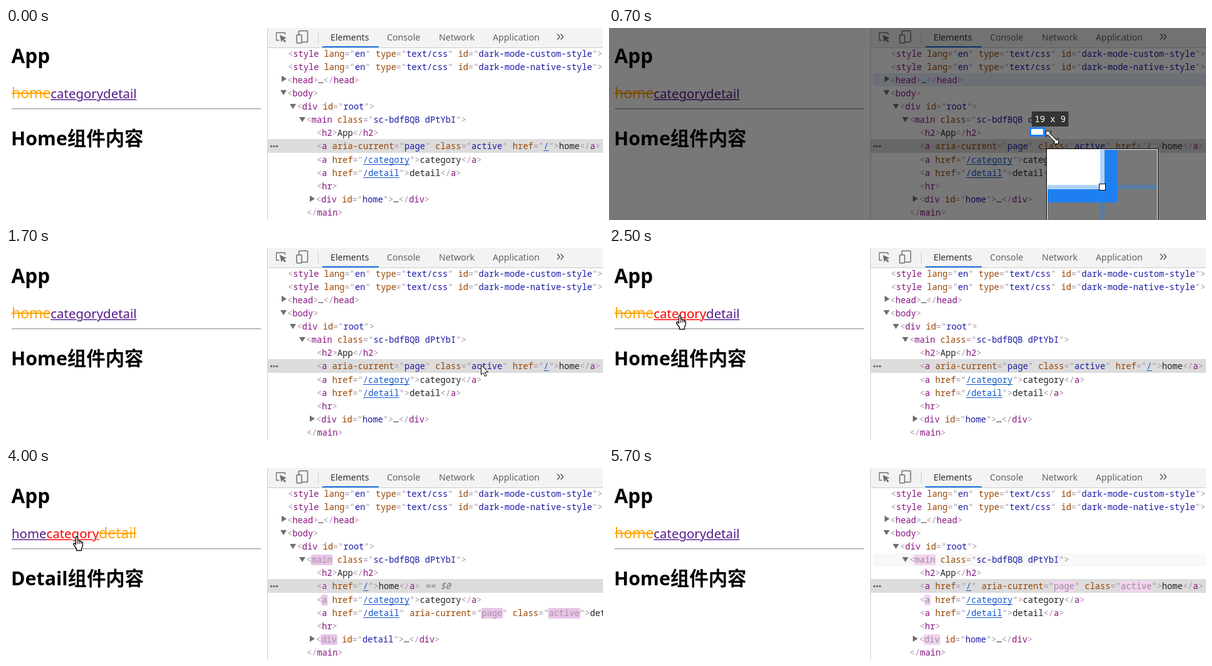
An HTML page with a canvas for the animation above (5800 ms loop, 953 by 306 pixels).

```html
<!DOCTYPE html>
<html lang="zh-CN">
<head>
<meta charset="utf-8">
<title>Router links</title>
<style>
html, body { margin: 0; width: 100%; height: 100%; overflow: hidden; background: #fff; }
canvas { display: block; width: 953px; height: 306px; }
</style>
</head>
<body>
<canvas id="stage" width="953" height="306"></canvas>
<script>
const canvas = document.getElementById('stage');
const ctx = canvas.getContext('2d');
const LOOP = 5800, STEP = 100;
const SANS = '"Noto Sans", "Noto Sans CJK SC", "Noto Sans CJK JP", sans-serif';
const MONO = '13.73px "Noto Sans Mono", monospace';
const BLUE = '#1e80f0';
const TAG = [136, 18, 128], VALUE = [26, 26, 166];
const PAGES = [
  { name: 'home', title: 'Home', path: '/', id: 'home' },
  { name: 'category', title: 'Category', path: '/category', id: 'csategory' },
  { name: 'detail', title: 'Detail', path: '/detail', id: 'detail' }
];
const NAVS = [[2700, 1], [3400, 2], [4100, 1], [4880, 0]];
const CAPTURE = { start: 200, detect: 300, drag: 700, drop: 1000, tools: 1300, end: 1600 };
// time, x, y of the pointer
const POINTER = [
  [100, 684, 82], [200, 684, 82], [600, 674, 161], [1600, 758, 186], [1700, 758, 186],
  [1800, 712, 183], [1900, 540, 184], [2000, 326, 181], [2200, 168, 134],
  [2400, 112, 106], [2800, 112, 106], [3100, 189, 109], [3500, 189, 109],
  [3900, 112, 108], [4200, 112, 108], [4600, 5, 103], [4800, 31, 103], [4900, 31, 103],
  [5000, 200, 130], [5100, 480, 146], [5200, 764, 146], [5300, 768, 146], [5400, 800, 285]
];

const lerp = (a, b, k) => a + (b - a) * k;
const mix = (a, b, k) => a.map((v, i) => lerp(v, b[i], k));
const rgb = (c, a = 1) => `rgba(${c.map(Math.round).join()},${a})`;

function rect(x, y, w, h, fill) {
  ctx.fillStyle = fill;
  ctx.fillRect(x, y, w, h);
}
function text(s, x, y, font, fill) {
  ctx.font = font;
  ctx.fillStyle = fill;
  ctx.fillText(s, x, y);
  return ctx.measureText(s).width;
}
function poly(pts, fill, stroke, width = 1, close = true) {
  ctx.beginPath();
  for (let i = 0; i < pts.length; i += 2) ctx.lineTo(pts[i], pts[i + 1]);
  if (close) ctx.closePath();
  if (fill) { ctx.fillStyle = fill; ctx.fill(); }
  if (stroke) { ctx.strokeStyle = stroke; ctx.lineWidth = width; ctx.stroke(); }
}
const line = (pts, color, width = 1) => poly(pts, null, color, width, false);
function round(x, y, w, h, r, fill, stroke, width = 1) {
  ctx.beginPath();
  ctx.roundRect(x, y, w, h, r);
  if (fill) { ctx.fillStyle = fill; ctx.fill(); }
  if (stroke) { ctx.strokeStyle = stroke; ctx.lineWidth = width; ctx.stroke(); }
}
function at(x, y, draw) {
  ctx.save();
  ctx.translate(x, y);
  draw();
  ctx.restore();
}

// cubic-bezier(0, 0, .2, 1)
function easeOut(x) {
  let lo = 0, hi = 1;
  for (let i = 0; i < 20; i++) {
    const s = (lo + hi) / 2;
    if (0.6 * s * s + 0.4 * s ** 3 < x) lo = s; else hi = s;
  }
  return 3 * lo * lo - 2 * lo ** 3;
}

function pointerAt(t) {
  const dragging = t >= CAPTURE.drag && t < CAPTURE.end;
  if (t < POINTER[0][0] || t > POINTER[POINTER.length - 1][0] || dragging) return null;
  const i = POINTER.findIndex(p => p[0] >= t);
  const b = POINTER[i], a = POINTER[Math.max(0, i - 1)];
  const k = b[0] > a[0] ? (t - a[0]) / (b[0] - a[0]) : 1;
  return { x: Math.round(lerp(a[1], b[1], k)), y: Math.round(lerp(a[2], b[2], k)) };
}

function route(t) {
  const state = { page: 0, fresh: t < NAVS[0][0], age: {} };
  for (const [time, next] of NAVS) {
    if (time > t) break;
    const age = t - time;
    Object.assign(state.age, { main: age, div: age, value: age, ['a' + state.page]: age });
    state.page = next;
  }
  return state;
}

function linkBoxes(page) {
  let x = 9;
  return PAGES.map((p, i) => {
    const font = (i === page ? 22.9 : 20.4) + 'px ' + SANS;
    ctx.font = font;
    const w = ctx.measureText(p.name).width;
    const box = { x, w, font, name: p.name };
    x += w;
    return box;
  });
}

function drawPage(page, links, hover) {
  text('App', 8.5, 55.7, 'bold 31.5px ' + SANS, '#000');
  links.forEach((l, i) => {
    if (i === page) {
      text(l.name, l.x, 112, l.font, '#ffa500');
      rect(l.x, 103, l.w, 2, '#ffa500');
      return;
    }
    const color = i === hover ? '#f00' : '#551a8b';
    rect(l.x, 113.5, l.w, 1.5, color);
    ctx.font = l.font;
    ctx.strokeStyle = '#fff';
    ctx.lineWidth = 2.5;
    ctx.lineJoin = 'round';
    ctx.strokeText(l.name, l.x, 112);
    text(l.name, l.x, 112, l.font, color);
  });
  rect(9, 128, 398, 1, '#9a9a9a');
  rect(9, 129, 398, 1, '#e0e0e0');
  text(PAGES[page].title + '组件内容', 8, 187, 'bold 30.4px ' + SANS, '#000');
}

function drawTabs() {
  rect(418, 0, 535, 31, '#f3f3f3');
  rect(418, 31, 535, 1, '#ccc');
  const ink = '#6e6e6e';
  line([436, 19.5, 431.5, 19.5, 431.5, 7.5, 445.5, 7.5, 445.5, 11], ink, 1.3);
  poly([437, 11, 448, 16, 443.5, 17.5, 447, 21, 445, 23, 441.5, 19, 439.5, 23], ink);
  round(467.5, 4.5, 14, 18, 1, null, ink, 1.5);
  round(464, 11, 8, 13, 1, '#f3f3f3', ink, 1.5);
  rect(498, 6, 1, 19, '#ccc');
  [['Elements', 519], ['Console', 609], ['Network', 692], ['Application', 778]].forEach(([s, x], i) =>
    text(s, x - 1, 20, '14.2px ' + SANS, i ? '#5f6368' : '#333'));
  rect(505, 29, 90, 2, '#1a73e8');
  for (const x of [880, 885.5]) line([x, 9.5, x + 4, 14, x, 18.5], '#5a5a5a', 1.5);
}

function mark(s, x, y, color, age) {
  if (age < 1400) {
    const k = easeOut(Math.min(1, age / 1120)), out = Math.max(0, (age - 1120) / 280);
    const w = ctx.measureText(s).width;
    round(x - 1, y - 13, w + 2, 17, 2.5, rgb(mix([158, 54, 153], [245, 219, 244], k), 1 - out));
    color = mix(mix([255, 255, 255], [150, 132, 152], k), color, out);
  }
  return text(s, x, y, MONO, rgb(color));
}

function drawRow(n, x, src, age = {}) {
  const y = Math.round(45.5 + n * 21.13);
  const soft = '#a894a6';
  ctx.font = MONO;
  const put = (s, fill) => { x += text(s, x, y, MONO, fill); };
  for (const m of src.matchAll(/(<\/?)(\w+)| ([\w-]+)="([^"]*)"|(>)|([^<>]+)/g)) {
    const [, open, tag, attr, value, end, body] = m;
    if (open) {
      put(open, soft);
      x += mark(tag, x, y, TAG, open === '<' ? age.tag : undefined);
    } else if (attr) {
      put(' ' + attr, '#994500');
      put('="', soft);
      if (attr === 'href') {
        const from = x;
        put(value, '#1155cc');
        rect(from, y + 2, x - from, 1, '#1155cc');
      } else {
        x += mark(value, x, y, VALUE, attr === 'id' ? undefined : age.value);
      }
      put('"', soft);
    } else if (end) {
      put(end, soft);
    } else {
      put(body, '#202124');
    }
  }
  return { x, y };
}

function drawTree(state, row, rowFill) {
  if (row >= 0) round(421, Math.round(29.5 + row * 21.2), 540, 21, 4, rowFill);
  rect(418, 177, 535, 22, '#dcdcdc');
  for (const x of [423.5, 428, 432.5]) rect(x - 1.5, 187, 3, 3, '#6e6e6e');

  const { page, age } = state;
  const anchor = i => {
    const p = PAGES[i], href = ` href="${p.path}"`, on = ' aria-current="page" class="active"';
    const attrs = i !== page ? href : state.fresh ? on + href : href + on;
    return `<a${attrs}>${p.name}</a>`;
  };
  const anchorAge = i => ({ tag: i !== page ? age['a' + i] : undefined, value: age.value });
  const style = kind => `<style lang="en" type="text/css" id="dark-mode-${kind}-style">`;

  drawRow(0, 450, style('custom'));
  drawRow(1, 450, style('native'));
  drawRow(2, 449, '<head>…</head>');
  drawRow(3, 449, '<body>');
  drawRow(4, 464.5, '<div id="root">');
  drawRow(5, 479.5, '<main class="sc-bdfBQB dPtYbI">', { tag: age.main });
  drawRow(6, 496, '<h2>App</h2>');
  const end = drawRow(7, 496, anchor(0), anchorAge(0));
  text(' == $0', end.x, end.y, 'italic ' + MONO, '#777');
  drawRow(8, 496, anchor(1), anchorAge(1));
  drawRow(9, 496, anchor(2), anchorAge(2));
  drawRow(10, 496, '<hr>');
  drawRow(11, 495, `<div id="${PAGES[page].id}">…</div>`, { tag: age.div });
  drawRow(12, 480, '</main>');

  const ink = '#6e6e6e';
  for (const [x, y] of [[440, 81], [485, 272]]) poly([x, y - 5, x + 8, y, x, y + 5], ink);
  for (const [x, y] of [[438, 103], [453, 125], [468, 146]]) poly([x, y - 4, x + 10, y - 4, x + 5, y + 4], ink);
}

function drawTip(target, box, up, tag, cls, size, sizeX) {
  rect(...target, 'rgba(111,168,220,.66)');
  const [x, y, w, h] = box;
  ctx.save();
  ctx.shadowColor = 'rgba(0,0,0,.3)';
  ctx.shadowBlur = 7;
  round(x, y, w, h, 4, '#fff');
  ctx.restore();
  const edge = up ? y : y + h, tip = up ? edge - 8 : edge + 8;
  poly([x + 10, edge, x + 18, tip, x + 26, edge], '#fff');
  const base = y + h / 2 + 5, font = '13.5px ' + SANS;
  const tw = text(tag, x + 10, base, 'bold ' + font, '#881280');
  text(cls, x + 10 + tw, base, font, '#1a1aa6');
  text(size, sizeX, base, font, '#5a5a5a');
}

function drawArrow(x, y) {
  at(x, y, () => poly([0.5, 0.5, 0.5, 16, 4, 12.8, 6.5, 18.5, 9, 17.4, 6.6, 11.8, 11.5, 11.8], '#fff', '#000'));
}
function drawHand(x, y) {
  at(x - 5, y, () => {
    ctx.beginPath();
    ctx.moveTo(4.5, 14);
    ctx.lineTo(4.5, 2.5);
    ctx.quadraticCurveTo(6, -0.5, 7.5, 2.5);
    ctx.lineTo(7.5, 8);
    ctx.quadraticCurveTo(9.5, 6.5, 10.3, 8.7);
    ctx.quadraticCurveTo(12.2, 7.5, 13, 9.8);
    ctx.quadraticCurveTo(15.5, 9, 15.5, 12);
    ctx.lineTo(15.2, 17);
    ctx.lineTo(13.5, 20);
    ctx.lineTo(13.5, 23.5);
    ctx.lineTo(5.5, 23.5);
    ctx.lineTo(5.5, 20.5);
    ctx.lineTo(0.8, 14);
    ctx.quadraticCurveTo(0.5, 11, 3, 12);
    ctx.closePath();
    ctx.fillStyle = '#fff';
    ctx.fill();
    ctx.strokeStyle = '#000';
    ctx.lineWidth = 1.3;
    ctx.stroke();
    for (const x of [7.5, 10.3, 13]) line([x, 9, x, 13], '#000');
  });
}
// Double-headed arrow along each given angle
function drawArrows(x, y, r, angles) {
  const head = r - 5;
  const half = [1.5, -1.5, head, -1.5, head, -4.5, r, 0, head, 4.5, head, 1.5, 1.5, 1.5];
  const pass = (fill, stroke) => angles.forEach(a => at(x, y, () => {
    ctx.rotate(a);
    poly(half, fill, stroke, 2);
    ctx.rotate(Math.PI);
    poly(half, fill, stroke, 2);
  }));
  pass('#000', '#000');
  pass('#fff');
  at(x, y, () => { ctx.rotate(angles[0]); rect(-2, -1.5, 4, 3, '#fff'); });
}

const lens = document.createElement('canvas');
lens.width = 25;
lens.height = 17;
function drawZoom(cx, cy, left, top) {
  const cols = lens.width, rows = lens.height, z = 7;
  ctx.imageSmoothingEnabled = false;
  const copy = lens.getContext('2d');
  copy.clearRect(0, 0, cols, rows);
  copy.drawImage(canvas, cx - 12, cy - 8, cols, rows, 0, 0, cols, rows);
  rect(left - 1, top - 1, cols * z + 4, rows * z + 4, '#000');
  rect(left, top, cols * z + 2, rows * z + 2, '#fff');
  at(left + 1, top + 1, () => {
    ctx.drawImage(lens, 0, 0, cols * z, rows * z);
    const tint = 'rgba(30,128,240,.35)';
    rect(12 * z, 0, z, 8 * z, tint);
    rect(12 * z, 9 * z, z, 8 * z, tint);
    rect(0, 8 * z, cols * z, z, tint);
    rect(12 * z - 2, 8 * z - 2, 11, 11, '#000');
    rect(12 * z - 1, 8 * z - 1, 9, 9, '#fff');
  });
}

function drawTools(alpha) {
  rect(255, 212, 574, 41, `rgba(245,245,245,${alpha})`);
  ctx.strokeStyle = '#4a8fdc';
  ctx.lineWidth = 1;
  ctx.strokeRect(254.5, 211.5, 575, 41);
  const ink = '#444', pale = '#858585';
  const icon = (x, draw) => at(x, 232, draw);
  icon(275, () => {
    ctx.strokeStyle = ink;
    ctx.lineWidth = 1.5;
    ctx.strokeRect(-9, -7, 14, 11);
    ctx.beginPath();
    ctx.ellipse(4, 4, 6, 5, 0, 0, 7);
    ctx.fillStyle = '#bbb';
    ctx.fill();
    ctx.stroke();
  });
  icon(315, () => line([-10, 5, -3, -3, 2, 3, 10, -5], ink, 1.8));
  icon(354, () => {
    line([-8, 8, 5, -5], ink, 1.8);
    poly([9, -9, 6, 1, -1, -6], ink);
  });
  icon(395, () => {
    poly([-9, 9, -7, 2, 4, -9, 9, -4, -2, 7], null, ink, 1.5);
    line([1, -6, 6, -1], ink, 1.5);
  });
  icon(435, () => {
    poly([-4, -2, 3, -9, 9, 1, 1, 5], null, ink, 1.8);
    poly([-4, -1, 1, 6, -7, 8], ink);
  });
  icon(475, () => {
    round(-8, -8, 16, 16, 0, null, ink, 1.5);
    rect(-8, -8, 8, 8, ink);
    rect(0, 0, 8, 8, ink);
  });
  icon(515, () => {
    rect(-8, -9, 16, 2, ink);
    rect(-1, -9, 2, 18, ink);
    rect(-8, -9, 1.5, 5, ink);
    rect(6.5, -9, 1.5, 5, ink);
  });
  icon(555, () => {
    poly([-9, 3, 3, -9, 9, -3, -3, 9], null, ink, 1.5);
    poly([-3, -3, 3, -9, 9, -3, 3, 3], ink);
  });
  for (const x of [577, 662]) rect(x, 222, 1, 20, '#999');
  for (const [x, s] of [[599, 1], [640, -1]]) icon(x, () => {
    ctx.scale(s, 1);
    poly([-9, -3, -2, -9, -2, 3], pale);
    ctx.beginPath();
    ctx.moveTo(-3, -3);
    ctx.quadraticCurveTo(8, -4, 7, 8);
    ctx.strokeStyle = pale;
    ctx.lineWidth = 3;
    ctx.stroke();
  });
  icon(685, () => {
    line([-6, -6, 6, 6], ink, 2);
    line([6, -6, -6, 6], ink, 2);
  });
  icon(725, () => {
    poly([1, -9, 9, -1, 6, 0, 3, 6, -6, -3, 0, -6], ink);
    line([-2, 2, -8, 8], ink, 2);
  });
  icon(763, () => {
    rect(-7, -8, 15, 16, ink);
    rect(-3, -8, 7, 5, '#ccc');
    rect(-4, 1, 9, 7, '#ccc');
  });
  icon(802, () => {
    round(-7, -8, 11, 13, 1, null, ink, 1.5);
    round(-3, -4, 11, 13, 1, '#ccc', ink, 1.5);
  });
}

function drawDim(hole) {
  ctx.beginPath();
  ctx.rect(0, 0, 953, 306);
  if (hole) ctx.rect(...hole);
  ctx.fillStyle = 'rgba(0,0,0,.53)';
  ctx.fill('evenodd');
}

function drawCapture(t, p) {
  if (t < CAPTURE.drag) {
    // The window under the pointer lights up as soon as it is detected
    if (t < CAPTURE.detect) drawDim();
    drawZoom(p.x, p.y, p.x + 7, p.y + 24);
    return;
  }
  const k = Math.min(1, (t - CAPTURE.drag) / (CAPTURE.drop - CAPTURE.drag));
  const x = 674, y = 161, w = Math.round(lerp(19, 152, k)), h = Math.round(lerp(9, 40, k));
  drawDim([x, y, w, h]);
  ctx.strokeStyle = BLUE;
  ctx.lineWidth = 3;
  ctx.lineJoin = 'miter';
  ctx.strokeRect(x - 1.5, y - 1.5, w + 3, h + 3);

  const done = t >= CAPTURE.tools, fading = done && t < CAPTURE.tools + STEP;
  const cx = done ? 758 : x + w - 1, cy = done ? 187 : y + h - 1;
  if (!done || fading) drawZoom(cx, cy, cx + (done ? 11 : 7), cy + (done ? 26 : 24));
  if (done) {
    ctx.save();
    ctx.beginPath();
    ctx.rect(0, 0, fading ? 768 : 953, 306);
    ctx.clip();
    drawTools(fading ? 0.52 : 1);
    ctx.restore();
  }
  const size = `${w} x ${h}`;
  ctx.font = MONO;
  rect(675, 133, ctx.measureText(size).width + 9, 24, '#333');
  text(size, 679.5, 150, MONO, '#fff');
  if (done) drawArrows(758.5, 187, 14, [0, Math.PI / 2]);
  else drawArrows(cx + 15.5, cy + 5.5, 13.5, [Math.PI / 4]);
}

function draw(t) {
  rect(0, 0, 953, 306, '#fff');
  const state = route(t), p = pointerAt(t);
  const capturing = t >= CAPTURE.start && t < CAPTURE.end;
  const links = linkBoxes(state.page);
  const hover = p && p.y > 90 && p.y < 118 ? links.findIndex(l => p.x >= l.x && p.x < l.x + l.w) : -1;

  let row = -1, rowFill = '#e6eefb';
  if (capturing) row = 2;
  else if (p && p.x > 418) row = Math.floor((p.y - 30) / 21.2);
  else if (t >= 5500) [row, rowFill] = [5, '#f8f8f8'];

  drawPage(state.page, links, hover);
  rect(417, 0, 1, 306, '#ccc');
  ctx.save();
  ctx.beginPath();
  ctx.rect(418, 32, 535, 274);
  ctx.clip();
  drawTree(state, row, rowFill);
  ctx.restore();
  drawTabs();

  if (p && t >= 1800 && row === 7)
    drawTip([9, 91, 62, 30], [8, 41, 172, 42], false, 'a', '.active', '49.61 × 24', 91);
  if (p && (row === 5 || row === 12))
    drawTip([9, 25, 398, 172], [8, 205, 320, 42], true, 'main', '.sc-bdfBQB.dPtYbI', '398.4 × 137.82', 222);

  if (capturing) drawCapture(t, p);
  if (p) (hover >= 0 ? drawHand : drawArrow)(p.x, p.y);
}

function frame() {
  const t = performance.now() % LOOP;
  draw(Math.floor(t / STEP) * STEP);
  requestAnimationFrame(frame);
}
frame();
</script>
</body>
</html>
```
